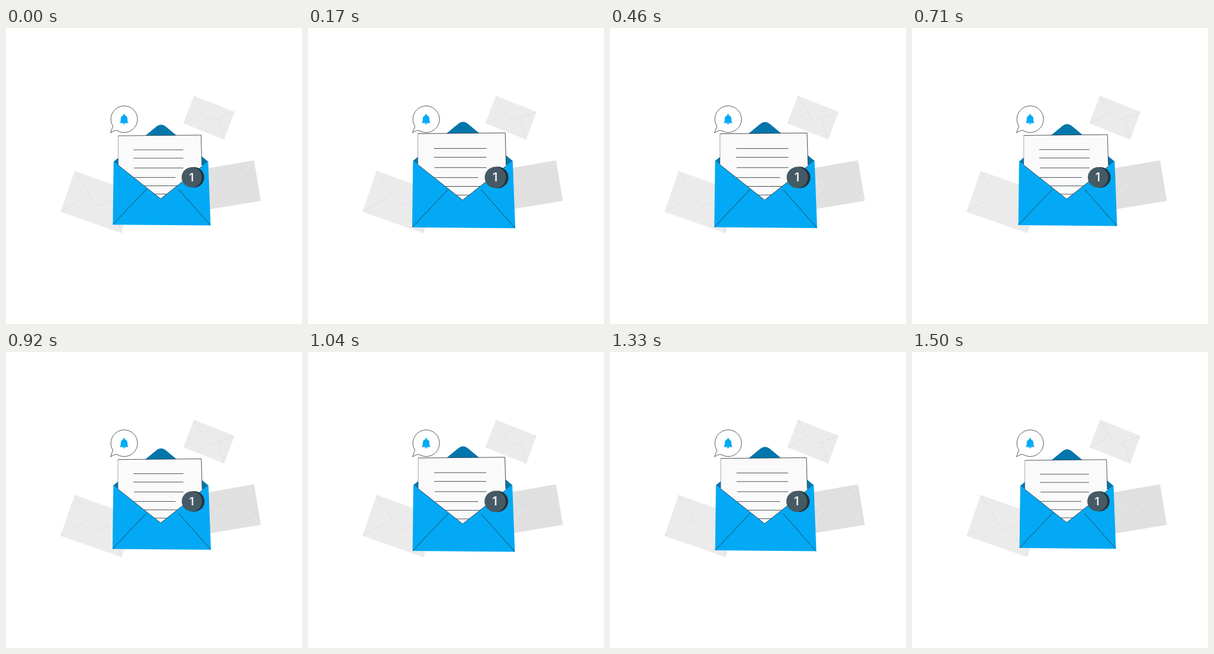
An HTML page that plays this animation: 500 px wide and 500 px high, repeating every 1540 ms.

```html
<!DOCTYPE html>
<html lang="en">
<head>
<meta charset="utf-8">
<title>New mail</title>
<style>
  html, body { margin: 0; height: 100%; overflow: hidden; background: #fff; }
  svg { display: block; width: 100%; height: 100%; }
  .ink { fill: none; stroke: #263238; stroke-width: .8; }
  .fold { fill: none; stroke-width: 1; }
  text { font: 600 19px Inter, sans-serif; fill: #f0f0f0; text-anchor: middle; }
</style>
</head>
<body>
<svg viewBox="0 0 500 500">
  <!-- background envelopes -->
  <g fill="#ebebeb" stroke="#e0e0e0">
    <path stroke="none" d="M317.5 114.5 386 141.5 368.5 188.5 299.5 161Z"/>
    <path class="fold" d="M317.5 115 343 157 386 142M300 161 333 143M368.5 188 358 152"/>
    <path stroke="none" d="M116 241.5 219 278 195 346.5 92 310.5Z"/>
    <path class="fold" d="M116 242 154 301 219 278M92.5 310 140 283M195 346 181 292"/>
  </g>
  <g fill="#e0e0e0" stroke="#ebebeb">
    <path stroke="none" d="M419 223.5 430.5 292 330 308.5 318 241Z"/>
    <path class="fold" d="M419 224 376 274 318 241M430 291.5 400 262M330 308 360 266"/>
  </g>

  <!-- main envelope -->
  <g id="mail">
    <path fill="#0276ab" d="M182.9 226 254.5 167.3Q262 161.4 269.5 167.3L340.4 226 261.5 288Z"/>
    <path fill="#fafafa" d="M190.6 183 328.6 181.8 330 234 261.5 288 190.6 233Z"/>
    <path class="ink" d="M190.6 183 328.6 181.8 330 232"/>
    <path class="ink" opacity=".5" d="M190.6 183V232"/>
    <path class="ink" d="M216 206.4H299M216 220.3H299M217 236.6H299M217 252.4H286M217 266.3H299M217 280H299"/>
    <path fill="#03a9f4" d="M182.9 225.7 261.3 288 340.4 225.7 344.5 332.4 181.6 331Z"/>
    <path class="ink" d="M190.6 232 261.3 288 330 234M182 330.5 238 271.5M344 332 291 272"/>
    <circle cx="316.8" cy="252.2" r="17" fill="#263238"/>
    <circle cx="313" cy="252.2" r="16.8" fill="#455a64"/>
    <text x="312.6" y="258.6">1</text>
  </g>

  <!-- notification bubble -->
  <path class="ink" style="fill: #fff" d="M176.5 177 180.6 166A22.5 22.5 0 1 1 188 173.3Q184 172 176.5 177Z"/>
  <path fill="#03a9f4" d="M198.2 147.6V146.5a1.3 1.3 0 0 1 2.6 0V147.6C204 148.4 205.2 151 205.2 154 205.2 157.5 205.6 158.8 207 160.6H192C193.4 158.8 193.8 157.5 193.8 154 193.8 151 195 148.4 198.2 147.6ZM197.3 161H201.7a2.2 1.6 0 0 1-4.4 0Z"/>
</svg>
<script>
const LOOP = 1540, STEPS = 37;
// [step, beat strength]: two linear heartbeats per loop
const keys = [[-1, 0], [6.2, 1], [20.5, 0], [27.9, 1], [36, 0], [43.2, 1]];
const mail = document.getElementById("mail");

function beat(step) {
  const i = keys.findIndex(key => key[0] > step);
  const [a, from] = keys[i - 1], [b, to] = keys[i];
  return from + (to - from) * (step - a) / (b - a);
}

function draw() {
  const step = Math.floor((performance.now() % LOOP + 4) / LOOP * STEPS) % STEPS;
  const scale = 1 + 0.1 * beat(step);
  mail.setAttribute("transform", `translate(263 248.2) scale(${scale}) translate(-263 -248.2)`);
  requestAnimationFrame(draw);
}
draw();
</script>
</body>
</html>
```
